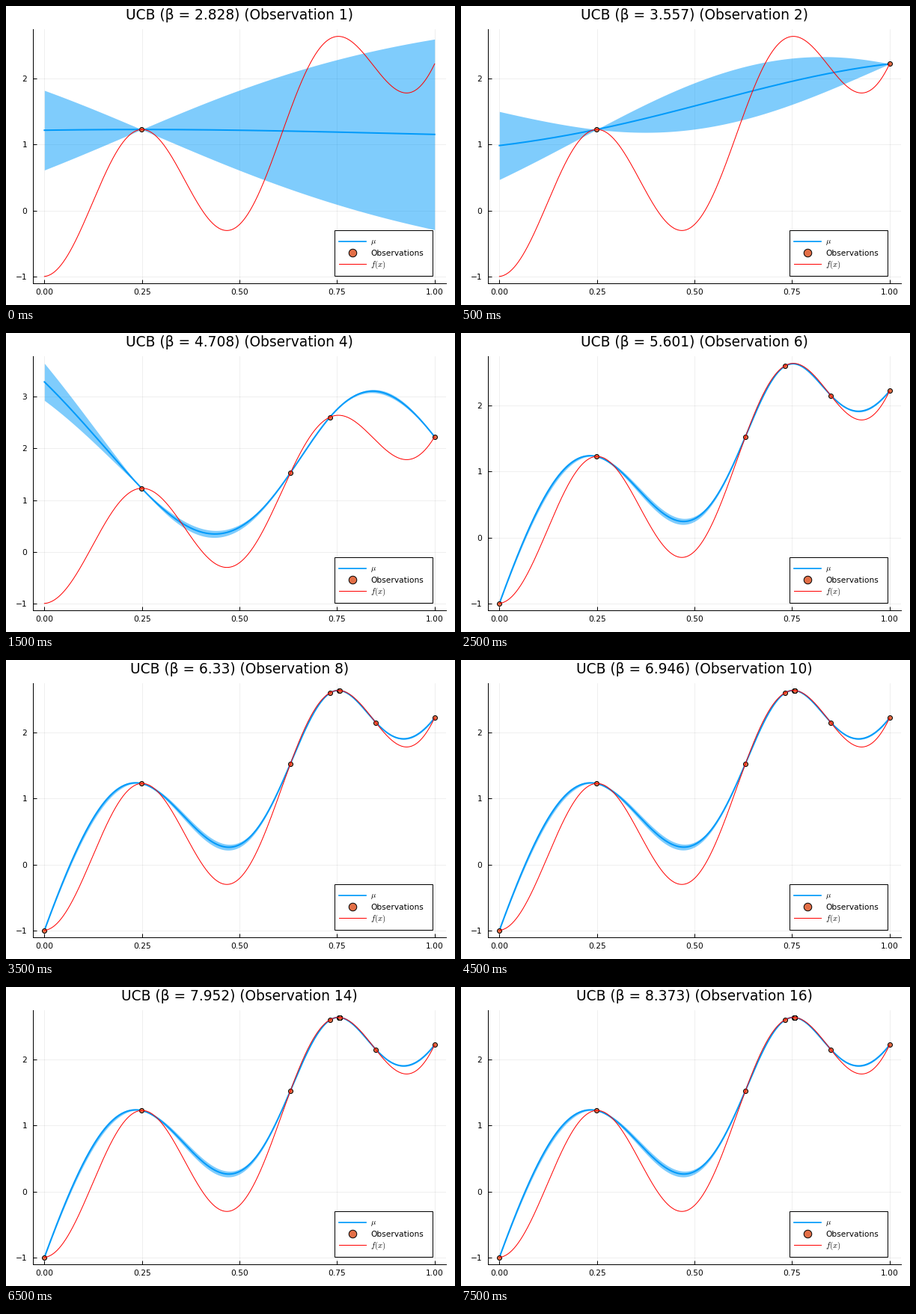
These frames come from a looping animation (600 by 400 pixels, 8000 ms). A matplotlib script:

```python
import numpy as np
import matplotlib.pyplot as plt
from matplotlib.animation import FuncAnimation
from matplotlib.patches import Rectangle
from matplotlib.ticker import FuncFormatter, MultipleLocator

W, H = 600, 400
PX = 0.72  # points per pixel at 100 dpi
BLUE, ORANGE, RED = "#009afa", "#e36f47", "#ff0000"
LEFT, RIGHT, TOP, BOTTOM = 35.7, 588.4, 31.0, 371.4
SMALL, LARGE = 32 / 3 * PX, 56 / 3 * PX

plt.rcParams.update({
    "font.family": "DejaVu Sans",
    "mathtext.fontset": "cm",
    "font.size": SMALL,
    "axes.linewidth": PX,
})

# Sampled locations, in the order they are observed
SAMPLES = np.array([0.249, 1, 0.7315, 0.6305, 0, 0.849, 0.755, 0.7565,
                    0.756, 0.757, 0.7555, 0.7575, 0.756, 0.757, 0.7565, 0.7575])


def f(x):
    return 3 * x**2 + 1.15 * x * (x - 0.66)**2 - np.cos(13 * x)


def matern52(a, b):
    s = np.sqrt(5) * np.abs(a[:, None] - b[None, :])
    return (1 + s + s**2 / 3) * np.exp(-s)


def posterior(x, obs, noise=1e-6, prior=1.0):
    k = matern52(obs, obs) + noise * np.eye(len(obs))
    kx = matern52(obs, x)
    weights = np.linalg.solve(k, kx)
    mean = prior + weights.T @ (f(obs) - prior)
    var = 1 - np.sum(kx * weights, axis=0)
    return mean, np.sqrt(np.maximum(var, 0))


def beta(n):
    return 2 * np.log((n + 4)**2 * np.pi**2 / 60)


xs = np.linspace(0, 1, 1001)
fx = f(xs)

fig = plt.figure(figsize=(W / 100, H / 100), dpi=100, facecolor="white")
ax = fig.add_axes([LEFT / W, 1 - BOTTOM / H, (RIGHT - LEFT) / W, (BOTTOM - TOP) / H])
ax.set_xlim(-0.03, 1.03)
ax.spines[["top", "right"]].set_visible(False)
ax.set_axisbelow(True)
ax.grid(color="black", alpha=0.1, linewidth=0.6 * PX)
ax.tick_params(direction="in", length=5 * PX, width=PX)
ax.tick_params(axis="x", pad=6.5 * PX)
ax.tick_params(axis="y", pad=7.5 * PX)
ax.xaxis.set_major_locator(MultipleLocator(0.25))
ax.xaxis.set_major_formatter(FuncFormatter(lambda v, _: f"{v:.2f}"))
ax.yaxis.set_major_locator(MultipleLocator(1))
ax.yaxis.set_major_formatter(
    FuncFormatter(lambda v, _: str(round(v)).replace("-", "\u2212")))

mean_line, = ax.plot([], [], color=BLUE, lw=2 * PX, zorder=3)
dots, = ax.plot([], [], "o", ms=6 * PX, mfc=ORANGE, mec="black", mew=PX, zorder=4)
ax.plot(xs, fx, color=RED, lw=PX, zorder=5)

# Overlay in pixel coordinates for the title and legend
top = fig.add_axes([0, 0, 1, 1])
top.set(xlim=(0, W), ylim=(H, 0))
top.axis("off")
title = top.text((LEFT + RIGHT) / 2, 18, "", fontsize=LARGE, ha="center", va="baseline")
top.add_patch(Rectangle((438.5, 299.5), 131, 61, fc="white", ec="black", lw=PX))
top.plot([444.5, 481], [315, 315], color=BLUE, lw=1.7 * PX)
top.plot(463, 330, "o", ms=10.5 * PX, mfc=ORANGE, mec="black", mew=PX)
top.plot([444.5, 481], [345.3, 345.3], color=RED, lw=PX)
for y, label in ((317.5, r"$\mu$"), (334.3, "Observations"), (348.5, "$f(x)$")):
    top.text(487, y, label, va="baseline")

band = None


def draw(i):
    global band
    n = i + 1
    obs = SAMPLES[:n]
    mean, sd = posterior(xs, obs)
    low, high = mean - 1.96 * sd, mean + 1.96 * sd
    if band is not None:
        band.remove()
    band = ax.fill_between(xs, low, high, color=BLUE, alpha=0.5, lw=0, zorder=2)
    mean_line.set_data(xs, mean)
    dots.set_data(obs, f(obs))
    lo, hi = min(low.min(), fx.min()), max(high.max(), fx.max())
    pad = 0.03 * (hi - lo)
    ax.set_ylim(lo - pad, hi + pad)
    title.set_text(f"UCB (β = {round(beta(n), 3)}) (Observation {n})")
    return band, mean_line, dots, title


anim = FuncAnimation(fig, draw, frames=len(SAMPLES), interval=500,
                     repeat=True, repeat_delay=0, blit=False)
plt.show()
```
